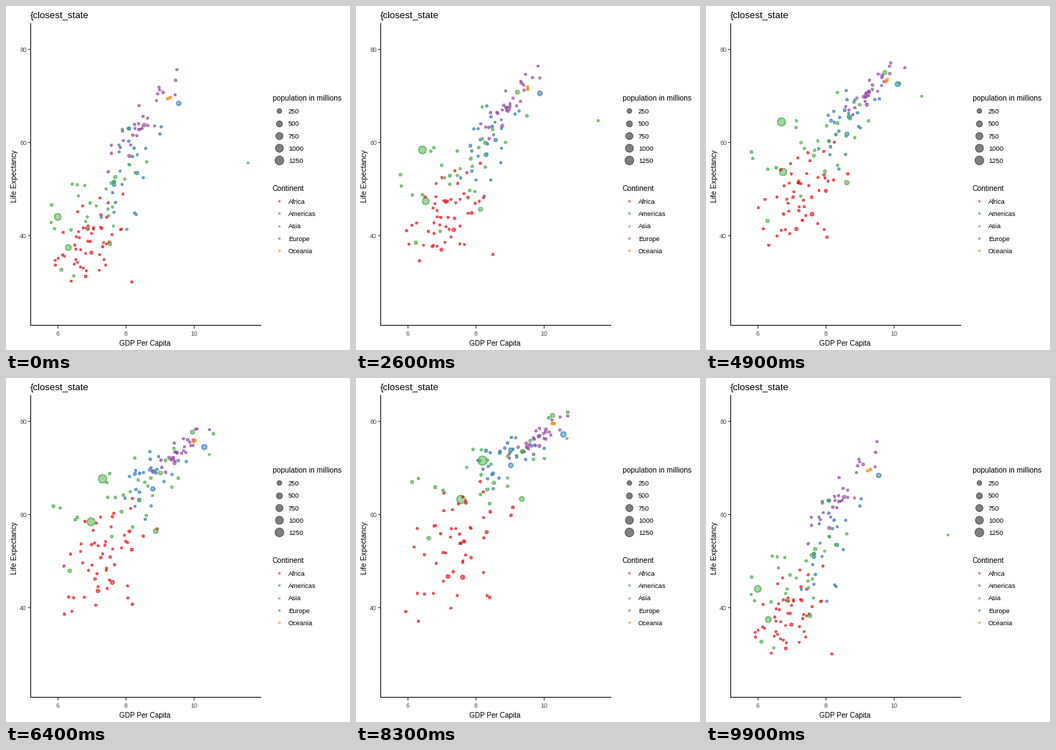
Write a matplotlib script that moves like this. It is 480 px wide and 480 px high and loops after 10 s.

```python
import numpy as np
import matplotlib.pyplot as plt
from matplotlib.animation import FuncAnimation

plt.rcParams["font.family"] = "Liberation Sans"
DPI, SIDE, STATES = 72, 480, 12
LAST = STATES - 1
K = np.arange(STATES)

# Per continent: colour, dots, largest population, share of it at the start, and
# log income (mean, spread) and life expectancy (mean, spread) at start, middle, end.
GROUPS = {
    "Africa": ("#E41A1C", 50, 80, 0.28, 0.45,
               [(6.9, 0.58, 39.1, 4.9), (7.25, 0.7, 49.6, 6), (7.4, 0.9, 54.8, 9.2)]),
    "Americas": ("#377EB8", 23, 110, 0.4, 0.7,
                 [(8.1, 0.5, 53.3, 8.8), (8.6, 0.5, 64.4, 6.2), (9, 0.6, 73.6, 3.8)]),
    "Asia": ("#4DAF4A", 29, 220, 0.4, 0.7,
             [(7.2, 0.8, 46.3, 8.8), (8, 1.1, 59.6, 9), (8.7, 1.2, 70.7, 7.4)]),
    "Europe": ("#984EA3", 30, 82, 0.75, 0.85,
               [(8.5, 0.55, 64.8, 5), (9.4, 0.42, 71.9, 2.8), (9.95, 0.5, 77.6, 2.5)]),
    "Oceania": ("#FF7F00", 2, 20, 0.45, 0.5,
                [(9.24, 0.03, 69.3, 0.2), (9.75, 0.06, 72.9, 0.6), (10.3, 0.12, 80.7, 0.5)]),
}

# Dots the eye follows: continent, first and last population, (state, income, life) points.
LEADERS = [
    ("Asia", 556, 1319, [(0, 5.99, 44), (2, 6.19, 44.5), (3, 6.42, 58.4), (5, 6.61, 64),
                         (7, 7.23, 67.3), (11, 8.51, 73)]),
    ("Asia", 372, 1110, [(0, 6.3, 37.4), (4, 6.59, 50.7), (8, 7.06, 60.2), (11, 7.8, 64.7)]),
    ("Asia", 86, 127, [(0, 8.08, 63), (4, 9.6, 73.4), (11, 10.36, 82.6)]),
    ("Asia", 0.2, 2.5, [(0, 11.59, 55.6), (4, 11.6, 67.7), (6, 10.35, 71.3), (11, 10.76, 77.6)]),
    ("Americas", 158, 301, [(0, 9.55, 68.4), (4, 9.99, 71.3), (11, 10.67, 78.2)]),
    ("Americas", 57, 190, [(0, 7.65, 50.9), (4, 8.51, 59.5), (11, 9.11, 72.4)]),
    ("Africa", 33, 135, [(0, 6.98, 36.3), (5, 7.59, 44.5), (11, 7.61, 46.9)]),
    ("Africa", 4, 12, [(0, 8.17, 30), (4, 8.61, 37.9), (5, 8.01, 39.5), (11, 8.48, 42.7)]),
]


def px(x):
    return 33.7 + (x - 5.178) * 47.4


def py(y):
    return 60.6 + (80 - y) * 6.49


def diameter(size):
    return 0.75 * (size * 2.845 + 0.94) - 0.9


def pop_diameter(pop):
    return diameter(1 + 5 * np.sqrt(pop / 1319))


def wander(rng, n):
    """Standing of n dots within their continent, drifting slowly over the states."""
    first, last = np.clip(rng.normal(size=(2, n, 1)), -1.8, 1.8)
    angle = 0.7 * K / LAST
    return first * np.cos(angle) + last * np.sin(angle)


def crowd(rng, n, top, share, link, stats):
    """Income, life expectancy and population of n dots in every state."""
    mx, sx, my, sy = [np.interp(K, [0, LAST / 2, LAST], col) for col in zip(*stats)]
    u, v = wander(rng, n), wander(rng, n)
    x = mx + sx * u + rng.normal(0, 0.05, (n, STATES))
    y = my + sy * (link * u + np.sqrt(1 - link ** 2) * v)
    pop = top / np.arange(1, n + 1)[:, None] ** 0.9 * (share + (1 - share) * K / LAST)
    return np.clip(x, 5.6, 10.7), np.clip(y, 28.8, 82), pop


def build():
    rng = np.random.default_rng(12)
    parts, colors = [], []
    for name, first, last, points in LEADERS:
        at, x, y = zip(*points)
        pop = np.interp(K, [0, LAST], [first, last])
        parts.append(np.array([[np.interp(K, at, x)], [np.interp(K, at, y)], [pop]]))
        colors.append(GROUPS[name][0])
    for color, n, *rule in GROUPS.values():
        parts.append(np.array(crowd(rng, n, *rule)))
        colors += [color] * n
    x, y, pop = np.concatenate(parts, axis=1)
    data = np.array([px(x), py(y), pop_diameter(pop)])
    return np.concatenate([data, data[:, :, :1]], axis=2), colors


DATA, COLORS = build()
STARTS = np.r_[5:42:9, 49:98:8]


def pose(frame):
    # 101 ticks are squeezed into 100 frames, so the middle tick is skipped
    tick = frame + (frame >= 50)
    phase = np.clip((tick - STARTS + 1) / 4, 0, 1).sum()
    k = min(int(phase), LAST)
    f = phase - k
    return DATA[:, :, k] * (1 - f) + DATA[:, :, k + 1] * f


fig = plt.figure(figsize=(SIDE / DPI, SIDE / DPI), dpi=DPI, facecolor="white")
ax = fig.add_axes([0, 0, 1, 1])
ax.set(xlim=(0, SIDE), ylim=(SIDE, 0))
ax.axis("off")


def label(x, y, s, size=8.8, color="black", ha="left"):
    ax.text(x, y, s, fontsize=size, color=color, ha=ha, va="center_baseline")


def line(x, y, color="black"):
    ax.plot(x, y, color=color, lw=1, solid_capstyle="butt", antialiased=False)


def dots(x, y, d, color):
    return ax.scatter(x, y, s=np.square(d), c=color, edgecolors=color,
                      linewidths=1, alpha=0.5, zorder=3, antialiased=False)


line([34, 34], [24, 445])
line([34, 355], [445, 445])
for v in (6, 8, 10):
    x = np.floor(px(v))
    line([x, x], [446, 449], "#333333")
    label(x, 456, str(v), color="#4D4D4D", ha="center")
for v in (40, 60, 80):
    y = np.floor(py(v))
    line([31, 34], [y, y], "#333333")
    label(29, y + 0.5, str(v), color="#4D4D4D", ha="right")

label(34, 13, "{closest_state", 13.2)
label(193.5, 469.5, "GDP Per Capita", 10, ha="center")
ax.text(12, 237, "Life Expectancy", fontsize=10.4, rotation=90, ha="center", va="center")

label(372, 128.5, "population in millions", 10.4)
for i, pop in enumerate((250, 500, 750, 1000, 1250)):
    y = 146.3 + 17.25 * i
    dots([380.5], [y], pop_diameter(pop), "black")
    label(394, y + 0.3, str(pop), 9.2)
label(372, 253.5, "Continent", 10.4)
for i, (name, group) in enumerate(GROUPS.items()):
    y = 272 + 17.3 * i
    dots([380.5], [y], diameter(1.3), group[0])
    label(394, y + 0.3, name, 9.2)

cloud = dots(DATA[0, :, 0], DATA[1, :, 0], DATA[2, :, 0], COLORS)


def draw(frame):
    x, y, d = pose(frame)
    cloud.set_offsets(np.column_stack([x, y]))
    cloud.set_sizes(d ** 2)
    return (cloud,)


anim = FuncAnimation(fig, draw, frames=100, interval=100, repeat=True, repeat_delay=0)
plt.show()
```
